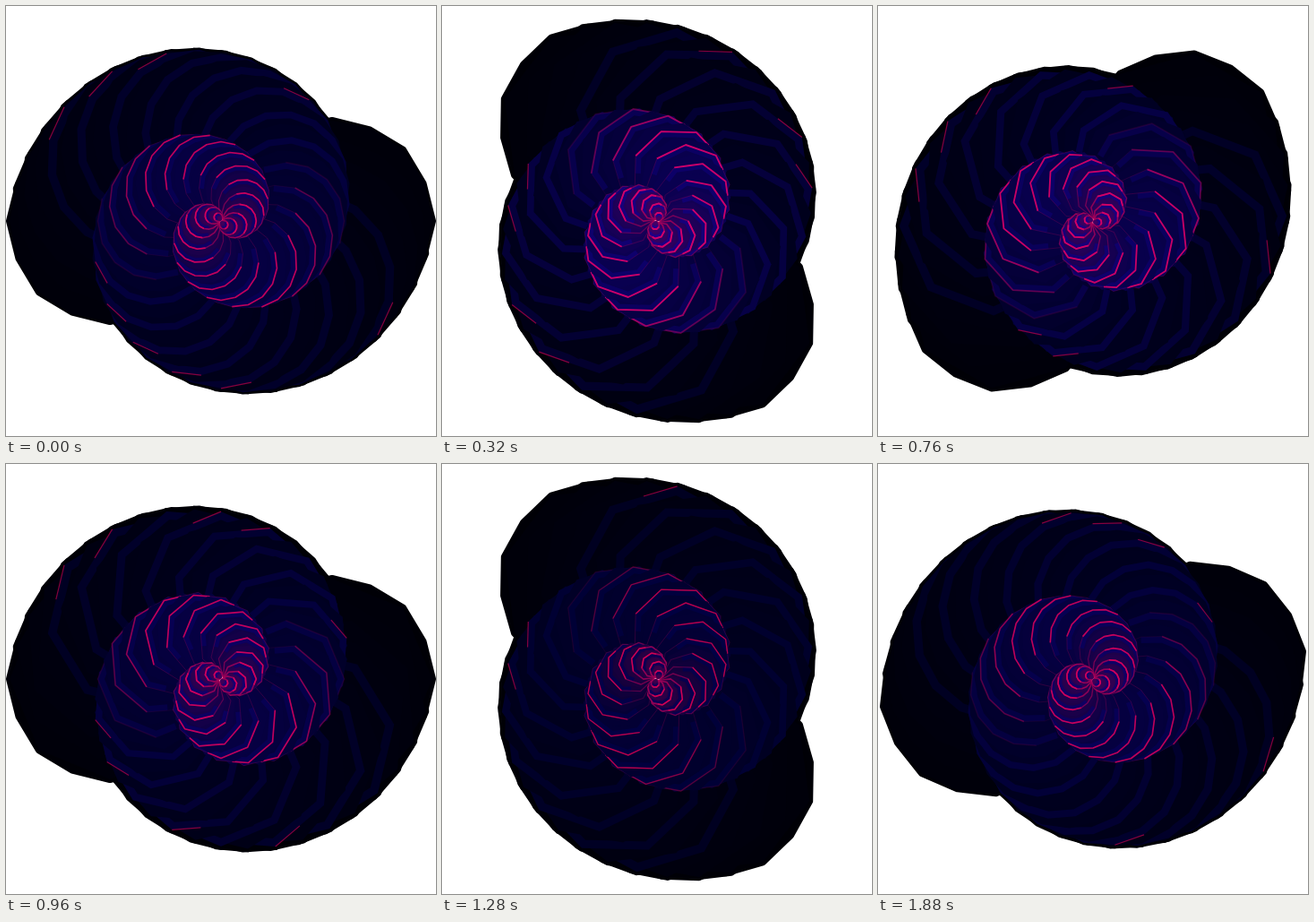
Write an HTML page with a canvas that moves like this. It is 480 px wide and 480 px high and loops after 1920 ms.

```html
<!DOCTYPE html>
<html>
<head>
<meta charset="utf-8">
<style>
  html, body { margin: 0; width: 100%; height: 100%; overflow: hidden; background: #fff; }
  canvas { display: block; width: 100%; height: 100%; }
</style>
</head>
<body>
<canvas id="stage" width="480" height="480"></canvas>
<script>
const ctx = document.getElementById('stage').getContext('2d');
const LOOP = 1920, STEP = 40, FRAMES = LOOP / STEP;
const RINGS = 48, TURN = Math.PI / 20, ORBIT = 124, RADIUS = 112, POINTS = 16;
const TAU = Math.PI * 2;

const mix = (a, b, k) => a + (b - a) * k;
const clamp = x => Math.max(0, Math.min(1, x));
const rgb = (r, g, b, a = 1) => `rgba(${Math.round(r)},${Math.round(g)},${Math.round(b)},${a})`;
const random = seed => {
  const x = Math.sin(seed * 12.9898) * 43758.5453;
  return x - Math.floor(x);
};

// An octagon reaching the centre; odd points bulge out when roundness rises.
function ringPoints(i, arm, frame, roundness) {
  const angle = frame / FRAMES * TAU + i * TURN + arm * Math.PI;
  const size = 1 - i / RINGS;
  const cx = 240 + ORBIT * size * Math.cos(angle);
  const cy = 240 + ORBIT * size * Math.sin(angle);
  const flat = mix(Math.cos(Math.PI / 8), 1, roundness);
  return Array.from({ length: POINTS }, (_, k) => {
    const a = angle + k * TAU / POINTS;
    const r = RADIUS * size * (k % 2 ? flat : 1);
    return [cx + r * Math.cos(a), cy + r * Math.sin(a)];
  });
}

function trace(points, from = 0, to = POINTS) {
  ctx.beginPath();
  for (let k = from; k <= to; k++) {
    const [x, y] = points[(k + POINTS) % POINTS];
    ctx.lineTo(x, y);
  }
}

function stroke(color, width) {
  ctx.strokeStyle = color;
  ctx.lineWidth = width;
  ctx.stroke();
}

function fill(color) {
  ctx.fillStyle = color;
  ctx.fill();
}

function fillColor(u, glow) {
  const inner = clamp((u - 0.34) / 0.26);
  const core = clamp((u - 0.65) / 0.35);
  const blue = mix(10, 36, clamp(u / 0.4)) + inner * mix(14, 46, glow) + core * 25;
  return rgb(inner * mix(2, 10, glow) + core * 60, 0, blue);
}

function drawShadow(i, arm, frame) {
  trace(ringPoints(i, arm, frame, 0.75));
  ctx.closePath();
  fill('#000006');
  stroke('#000006', 8);
}

function drawRing(i, arm, frame, glow, roundness) {
  const u = i / RINGS;
  const points = ringPoints(i, arm, frame, roundness);
  trace(points);
  ctx.closePath();
  fill(fillColor(u, glow));
  if (i % 2 || i < 4) return;

  // A blue ridge inside the leading edges.
  ctx.save();
  ctx.clip();
  trace(points, -5, 3);
  stroke(rgb(24 * u * glow, 0, mix(34, mix(90, 165, glow), u), 0.75), mix(20, 6, u));
  ctx.restore();

  const bright = clamp((u - 0.4) / 0.14);
  const core = clamp((u - 0.7) / 0.15);
  if (bright > 0) {
    trace(points);
    stroke(rgb(180, 0, 90, bright * mix(0.25, 0.8, core)), mix(1, 1.6, core));
    trace(points, -4, 1);
    const alpha = bright * mix(0.7, 0.95, glow);
    stroke(rgb(mix(235, 215, glow), 0, mix(80, 110, glow), alpha), mix(1.4, 1.9, glow));
  } else if (random(i * 7 + arm * 31 + Math.floor(frame / 2) * 3) < 0.4) {
    trace(points, -1, 0);
    stroke(rgb(190, 0, 75, 0.7), 1.2);
  }
}

function eachRing(count, paint) {
  for (let i = 0; i < count; i++) {
    paint(i, 0);
    paint(i, 1);
  }
}

function draw(time) {
  const frame = Math.floor((time % LOOP) / STEP);
  const phase = frame / FRAMES * TAU;
  const glow = 0.5 + 0.5 * Math.sin(phase);
  const roundness = Math.max(0, Math.cos(phase)) ** 6;
  ctx.fillStyle = '#fff';
  ctx.fillRect(0, 0, 480, 480);
  ctx.lineJoin = 'round';
  eachRing(RINGS / 2, (i, arm) => drawShadow(i, arm, frame));
  eachRing(RINGS, (i, arm) => drawRing(i, arm, frame, glow, roundness));
}

const start = performance.now();
function tick() {
  draw(performance.now() - start);
  requestAnimationFrame(tick);
}
tick();
</script>
</body>
</html>
```
